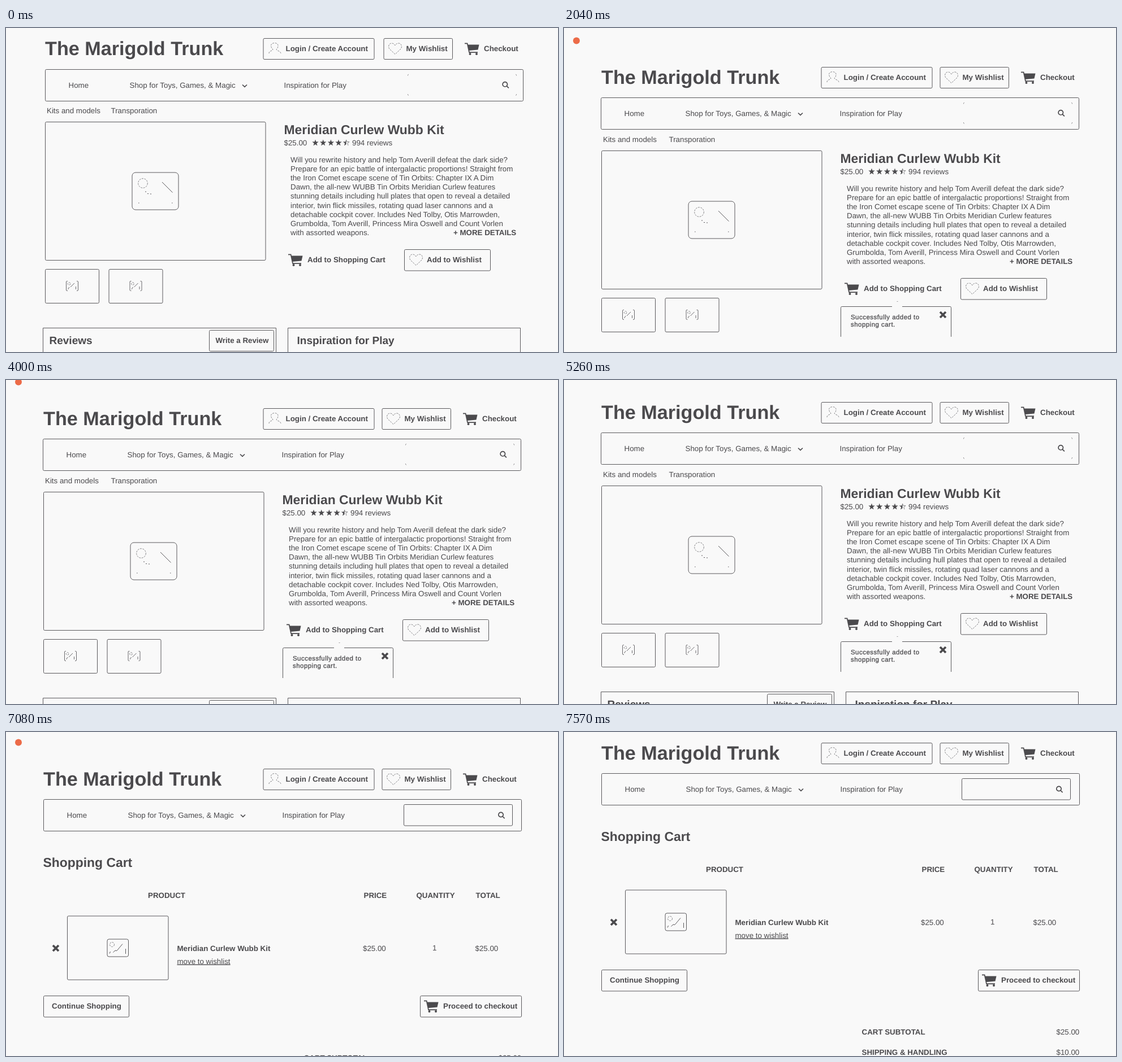
Recreate the animation shown at these times as an HTML page. Size 976 by 574 pixels, loop 8 s.

```html
<!DOCTYPE html>
<html lang="en">
<head>
<meta charset="utf-8">
<title>Toy shop wireframe</title>
<style>
html, body { margin: 0; width: 100%; height: 100%; overflow: hidden; background: #f9f9f9; }
svg { display: block; width: 976px; height: 574px; }
text { font: 13.33px "Liberation Sans", Arial, sans-serif; fill: #4b4a4d; text-rendering: geometricPrecision; white-space: pre; }
.b { font-weight: 700; }
.title { font-size: 34.2px; }
.h1 { font-size: 22.9px; }
.h2 { font-size: 19px; }
.note { font-size: 11.43px; letter-spacing: .5px; stroke: #4b4a4d; stroke-width: .3px; }
.box, .line { fill: none; stroke: #5a595c; }
.box { rx: 2px; }
.faint { fill: none; stroke: #77767a; stroke-width: .9px; stroke-dasharray: 3 1.6; }
.solid { fill: #4b4a4d; }
.thick { fill: none; stroke: #4b4a4d; stroke-width: 1.7px; }
.cross { fill: none; stroke: #4b4a4d; stroke-width: 3.8px; }

/* Every change is a hard cut within an 8 s loop. */
.scroll, .shift, .nav, .shop, .cart, .popup { animation: 8s step-end infinite; }
.scroll { animation-name: scroll; }
.shift { animation-name: shift; }
.nav { animation-name: nav; }
.shop { animation-name: shop; }
.cart { animation-name: cart; }
.popup { animation-name: popup; }
@keyframes scroll {
  0% { transform: translateY(-51px); }
  25.5% { transform: translateY(0); }
  48.25% { transform: translateY(-4px); }
  49.125% { transform: translateY(-11px); }
  50% { transform: translateY(-19px); }
  50.875% { transform: translateY(-26px); }
  51.75% { transform: translateY(-30px); }
  77.125% { transform: translateY(0); }
  88.5% { transform: translateY(-4px); }
  89.375% { transform: translateY(-10px); }
  90.25% { transform: translateY(-17px); }
  91.125% { transform: translateY(-25px); }
  92% { transform: translateY(-33px); }
  92.875% { transform: translateY(-40px); }
  93.75% { transform: translateY(-46px); }
  94.625%, 100% { transform: translateY(-50px); }
}
@keyframes shift {
  0% { transform: translateX(3px); }
  23.75%, 100% { transform: translateX(0); }
}
@keyframes nav {
  0% { transform: translate(4px, 1px); }
  23.75% { transform: translate(0, 1px); }
  25.5% { transform: translate(0, 0); }
  77.125%, 100% { transform: translate(1px, 0); }
}
@keyframes popup {
  0% { opacity: 0; }
  23.75%, 100% { opacity: 1; }
}
@keyframes shop {
  0% { opacity: 1; }
  77.125%, 100% { opacity: 0; }
}
@keyframes cart {
  0% { opacity: 0; }
  77.125%, 100% { opacity: 1; }
}
</style>
</head>
<body>
<svg viewBox="0 0 976 574">
  <defs>
    <g id="trolley">
      <path class="solid" d="M5.5 4H25.5L23.5 13L7.5 14.5Z"/>
      <path class="thick" d="M0 1.8H4.6L8 17.6H23"/>
      <circle class="solid" cx="9.5" cy="20.6" r="2"/>
      <circle class="solid" cx="21" cy="20.6" r="2"/>
    </g>
    <path id="heart" class="faint" d="M12 20.5L2 11C-1 7 1 1 6 1C9 1 11 3 12 5C13 3 15 1 18 1C23 1 25 7 22 11Z"/>
    <path id="star" class="solid" d="M0-6L1.4-1.9H5.7L2.3.7L3.5 4.9L0 2.4L-3.5 4.9L-2.3.7L-5.7-1.9H-1.4Z"/>
    <g id="lens">
      <circle class="thick" r="4.2"/>
      <path class="thick" d="M3 3L6.6 6.6"/>
    </g>
    <path id="cross" class="cross" d="M-5-5L5 5M5-5L-5 5"/>
    <g id="thumb">
      <rect class="box" x=".5" y=".5" width="95" height="60"/>
      <path class="line" stroke-width=".9" d="M40 21.5H38.5Q37.5 21.5 37.5 23V37Q37.5 38.5 39 38.5H40M56 21.5H57.5Q58.5 21.5 58.5 23V37Q58.5 38.5 57 38.5H56M40.5 36L43 32M45 32L52 25M54.5 31V36"/>
      <circle class="faint" cx="42.5" cy="26" r="2.3"/>
    </g>
  </defs>

  <g class="scroll">
    <circle cx="22" cy="22.5" r="6" fill="#ec6b48"/>

    <!-- Header -->
    <text class="b title shift" x="66" y="99">The Marigold Trunk</text>
    <rect class="box" x="455" y="69.5" width="196" height="37"/>
    <path class="faint" d="M465 96C465 91 471 92 472 89C467 84 467 78 475 77.5C483 78 482 85 478 89C479 92 485 91 486 96"/>
    <text class="b" x="494.5" y="91.6">Login / Create Account</text>
    <g class="shift">
      <rect class="box" x="665" y="69.5" width="121.5" height="37"/>
      <use href="#heart" x="673" y="77"/>
      <text class="b" x="704.5" y="91.6">My Wishlist</text>
      <use href="#trolley" x="808" y="76.5"/>
      <text class="b" x="842" y="91.6">Checkout</text>
    </g>
    <g class="nav">
      <rect class="box" x="65.5" y="123.5" width="845" height="56"/>
      <text x="106.5" y="155.7">Home</text>
      <text x="214.5" y="155.7">Shop for Toys, Games, &amp; Magic</text>
      <path class="thick" d="M414 150.5L418 154.3L422 150.5"/>
      <text x="487.5" y="155.7">Inspiration for Play</text>
    </g>

    <!-- Product page -->
    <g class="shop">
      <g class="nav">
        <path class="line" opacity=".6" d="M706.5 134.5V133L708 132M706.5 167V168.5L708 169.5M898.5 134.5V133L897 132M898.5 167V168.5L897 169.5"/>
        <use href="#lens" x="878.3" y="149.8"/>
      </g>
      <text x="185.5" y="201.6">Transporation</text>
      <g class="shift">
        <text x="69" y="201.6">Kits and models</text>
        <rect class="box" x="66.5" y="217.5" width="389.5" height="245"/>
        <rect class="line" x="220" y="307" width="82" height="66" rx="6"/>
        <circle class="faint" cx="239" cy="326" r="8.3"/>
        <path class="line" d="M273 324L291.5 342.5"/>
        <path class="line" d="M243 341h2M247 344.5h2M252 345h2M231 361h1.5M290 361h1.5"/>
        <use href="#thumb" x="66" y="478"/>
        <use href="#thumb" x="178.5" y="478"/>

        <text class="b h1" x="488.5" y="238.7">Meridian Curlew Wubb Kit</text>
        <text x="488.5" y="258.7">$25.00</text>
        <use href="#star" x="544" y="254.5"/>
        <use href="#star" x="557.7" y="254.5"/>
        <use href="#star" x="571.4" y="254.5"/>
        <use href="#star" x="585" y="254.5"/>
        <path class="solid" d="M598.5 248.5V256.9L595 259.4L596.2 255.2L592.8 252.6H597.1Z"/>
        <path class="line" stroke-width=".7" d="M598.5 249L599.9 252.6H604L600.8 255.2L602 259.2"/>
        <text x="609" y="258.7">994 reviews</text>
        <g id="blurb"></g>
        <text class="b" x="788" y="418.3">+ MORE DETAILS</text>
        <use href="#trolley" x="496" y="450.5"/>
        <text class="b" x="530" y="466.2">Add to Shopping Cart</text>
        <rect class="box" x="701.5" y="443.5" width="152" height="37.5"/>
        <use href="#heart" x="710" y="451"/>
        <text class="b" x="741" y="466.2">Add to Wishlist</text>
      </g>

      <g class="popup">
        <path class="line" d="M489.5 547V495.5Q489.5 493.5 491.5 493.5H580M598 493.5H682.5Q684.5 493.5 684.5 495.5V547"/>
        <path class="line" opacity=".6" d="M588.5 484.5h2"/>
        <text class="note" x="507" y="515.6">Successfully added to</text>
        <text class="note" x="507" y="529">shopping cart.</text>
        <use href="#cross" x="670" y="508"/>
      </g>

      <path class="line" d="M65.5 640V582.5H477.5V640M498.5 640V582.5H909.5V640"/>
      <text class="b h2" x="76.5" y="610.8">Reviews</text>
      <rect class="box" x="359.5" y="586.5" width="114" height="37"/>
      <text class="b" x="370.5" y="608.8">Write a Review</text>
      <text class="b h2" x="514.5" y="610.8">Inspiration for Play</text>
    </g>

    <!-- Cart page -->
    <g class="cart">
      <rect class="box" x="703.5" y="132.5" width="192" height="37.5"/>
      <use href="#lens" x="875" y="150.5"/>
      <text class="b h1" x="65.5" y="242.8">Shopping Cart</text>
      <text class="b" x="251" y="298.2">PRODUCT</text>
      <text class="b" x="632.5" y="298.2">PRICE</text>
      <text class="b" x="725.5" y="298.2">QUANTITY</text>
      <text class="b" x="830.5" y="298.2">TOTAL</text>
      <use href="#cross" x="88" y="387"/>
      <rect class="box" x="108.5" y="330" width="178.5" height="113"/>
      <rect class="line" x="179" y="371" width="37.5" height="31" rx="3"/>
      <circle class="faint" cx="187.5" cy="380.5" r="4"/>
      <path class="line" d="M183 396.5L184.5 393M189.5 394.5L193 391L196 391.5L206 379.5M211.5 388V397"/>
      <text class="b" x="302.5" y="391.8">Meridian Curlew Wubb Kit</text>
      <text x="302.5" y="414.6" text-decoration="underline">move to wishlist</text>
      <text x="631" y="391.8">$25.00</text>
      <text x="754" y="391.4">1</text>
      <text x="829.5" y="391.8">$25.00</text>
      <rect class="box" x="66.5" y="471.5" width="151" height="37.5"/>
      <text class="b" x="81" y="494.2">Continue Shopping</text>
      <rect class="box" x="732.5" y="471.5" width="179" height="37.5"/>
      <use href="#trolley" x="739" y="478.5"/>
      <text class="b" x="773" y="494.2">Proceed to checkout</text>
      <text class="b" x="526.5" y="585.8">CART SUBTOTAL</text>
      <text x="870.5" y="585.8">$25.00</text>
      <text class="b" x="526.5" y="621.8">SHIPPING &amp; HANDLING</text>
      <text x="870.5" y="621.8">$10.00</text>
    </g>
  </g>
</svg>
<script>
const lines = [
  "Will you rewrite history and help Tom Averill defeat the dark side?",
  "Prepare for an epic battle of intergalactic proportions! Straight from",
  "the Iron Comet escape scene of Tin Orbits: Chapter IX A Dim",
  "Dawn, the all-new WUBB Tin Orbits Meridian Curlew features",
  "stunning details including hull plates that open to reveal a detailed",
  "interior, twin flick missiles, rotating quad laser cannons and a",
  "detachable cockpit cover. Includes Ned Tolby, Otis Marrowden,",
  "Grumbolda, Tom Averill, Princess Mira Oswell and Count Vorlen",
  "with assorted weapons."
];
document.getElementById("blurb").innerHTML = lines
  .map((line, i) => `<text x="500" y="${288.6 + i * 16.2}">${line}</text>`)
  .join("");
</script>
</body>
</html>
```
